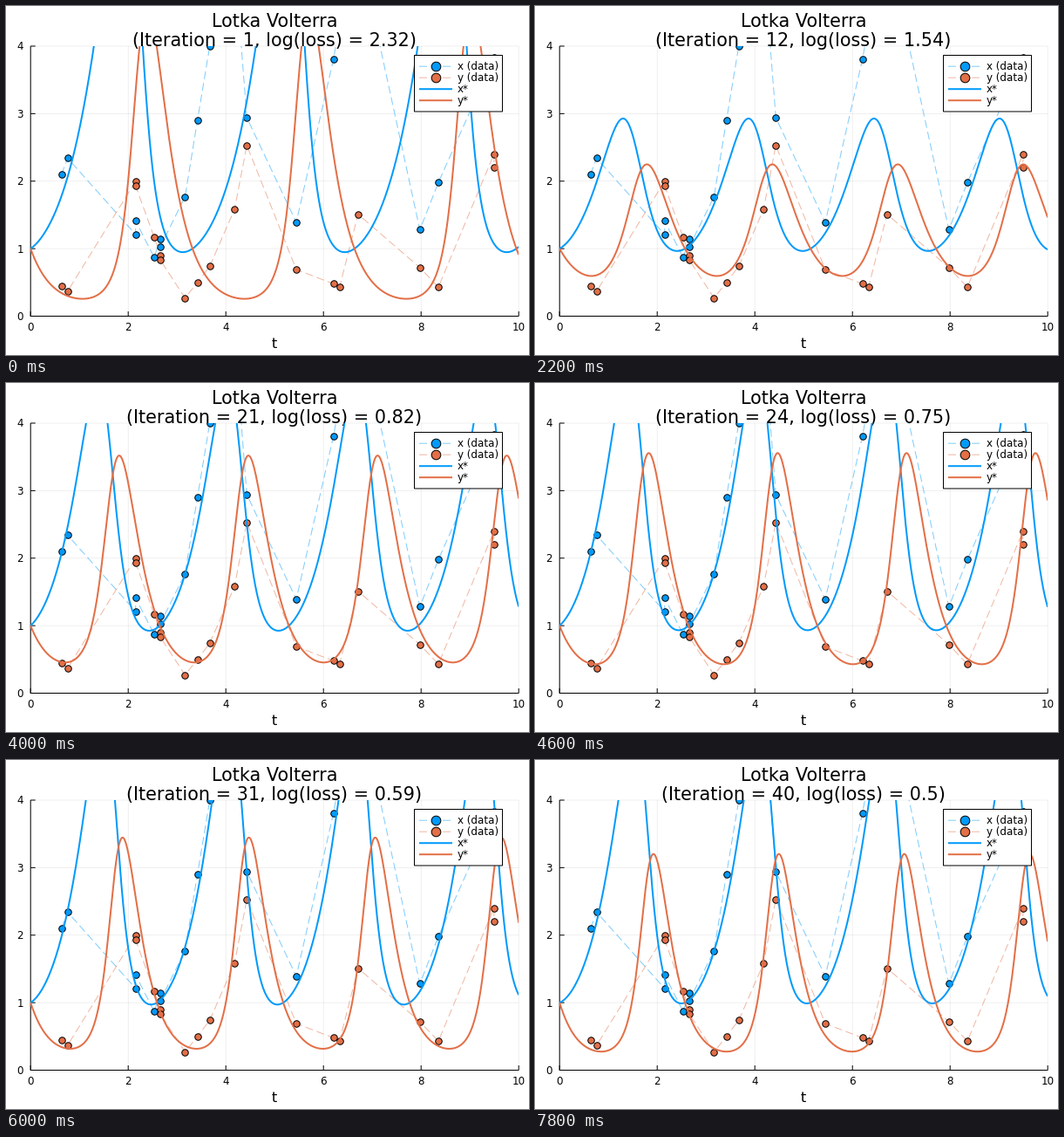
A matplotlib script that plays this animation: 600 by 400 pixels, repeating every 8 s.

```python
import numpy as np
import matplotlib.pyplot as plt
from matplotlib.animation import FuncAnimation
from matplotlib.patches import Rectangle

plt.rcParams["font.family"] = "DejaVu Sans"
plt.rcParams["path.snap"] = False

W, H, DPI = 600, 400, 100
PT = 72 / DPI                      # points per pixel
LEFT, RIGHT, TOP, BOTTOM = 28.2, 588.2, 46, 355.5
BLUE, RED = "#009AFA", "#E36F47"
N_ITER, STEP_MS = 40, 200

# turning points of the search: growth, predation, conversion, death, log(loss)
SEARCH = {
    1: (1.5, 1, 1, 3, 2.32),
    6: (1.955, 1.895, 1.882, 2.834, 1.76),
    12: (2.11, 1.696, 1.701, 3.009, 1.54),
    13: (1.9, 1.4, 1.35, 4.2, 1.49),
    21: (2.016, 1.346, 1.387, 3.191, 0.82),
    28: (1.988, 1.401, 1.331, 3.394, 0.68),
    35: (1.809, 1.517, 1.561, 3.904, 0.5),
}

# measured points: index on an 80-step time grid, x, y
SAMPLES = np.array([
    (5, 2.1, 0.45), (6, 2.34, 0.37), (17, 1.21, 2.0), (17, 1.41, 1.93),
    (20, 0.87, 1.17), (21, 1.15, 0.9), (21, 1.03, 0.83), (25, 1.77, 0.27),
    (27, 2.9, 0.5), (29, 4.0, 0.74), (33, 5.3, 1.58), (35, 2.94, 2.53),
    (43, 1.39, 0.69), (49, 3.8, 0.48), (50, 4.3, 0.43), (53, 5.5, 1.51),
    (63, 1.28, 0.72), (66, 1.98, 0.43), (75, 3.83, 2.4), (75, 3.6, 2.2),
])


def monotone(keys, vals, at):
    """Piecewise cubic through the keys without overshoot, held at the end."""
    at = np.minimum(at, keys[-1])
    h = np.diff(keys)[:, None]
    s = np.diff(vals, axis=0) / h
    prod, total = s[:-1] * s[1:], s[:-1] + s[1:]
    same = prod > 0
    inner = np.where(same, 2 * prod / np.where(same, total, 1), 0)
    m = np.vstack([s[:1], inner, 0 * s[-1:]])
    i = np.clip(np.searchsorted(keys, at, side="right") - 1, 0, len(keys) - 2)
    u = ((at - keys[i]) / h[i, 0])[:, None]
    return (vals[i] * (1 + 2 * u) * (1 - u) ** 2
            + vals[i + 1] * u ** 2 * (3 - 2 * u)
            + h[i] * u * (1 - u) * (m[i] * (1 - u) - m[i + 1] * u))


def solve(a, b, c, d, t):
    """Runge-Kutta for every parameter set at once; shape (time, 2, set)."""
    def rate(z):
        x, y = z
        return np.array([x * (a - b * y), y * (c * x - d)])

    dt = t[1] - t[0]
    z = np.ones((2, len(a)))
    out = [z]
    for _ in t[1:]:
        k1 = rate(z)
        k2 = rate(z + dt / 2 * k1)
        k3 = rate(z + dt / 2 * k2)
        k4 = rate(z + dt * k3)
        z = z + dt / 6 * (k1 + 2 * k2 + 2 * k3 + k4)
        out.append(z)
    return np.array(out)


path = monotone(np.array(list(SEARCH), float), np.array(list(SEARCH.values())),
                np.arange(1, N_ITER + 1))
time = np.linspace(0, 10, 1001)
orbit = solve(*path[:, :4].T, time)
losses = path[:, 4]

fig = plt.figure(figsize=(W / DPI, H / DPI), dpi=DPI, facecolor="white")
page = fig.add_axes([0, 0, 1, 1], zorder=1)
plot = fig.add_axes([LEFT / W, 1 - BOTTOM / H, (RIGHT - LEFT) / W,
                     (BOTTOM - TOP) / H], zorder=2)
key = fig.add_axes([0, 0, 1, 1], zorder=3)
for layer in (page, key):
    layer.set(xlim=(0, W), ylim=(H, 0))
    layer.axis("off")
plot.set(xlim=(0, 10), ylim=(0, 4))
plot.axis("off")


def label(ax, x, y, text, size, ha="center"):
    return ax.text(x, y, text, fontsize=size * PT, ha=ha, va="baseline")


def stroke(ax, xs, ys, color="black", width=1.0, **kw):
    return ax.plot(xs, ys, color=color, lw=width * PT,
                   solid_capstyle="butt", **kw)[0]


def series(ax, xs, ys, color, size):
    """Pale dashed line with outlined dots on it."""
    stroke(ax, xs, ys, color, alpha=0.5, ls=(0, (9, 4.5)))
    ax.scatter(xs, ys, s=(size * PT) ** 2, color=color, edgecolors="black",
               linewidths=PT, zorder=2)


# axes, ticks and grid
for v in range(0, 11, 2):
    px = LEFT + (RIGHT - LEFT) * v / 10
    stroke(page, [px, px], [TOP, BOTTOM], width=0.6, alpha=0.1)
    stroke(page, [px, px], [BOTTOM, BOTTOM - 5.5])
    label(page, px, 371.5, str(v), 11.9)
for v in range(5):
    py = BOTTOM + (TOP - BOTTOM) * v / 4
    stroke(page, [LEFT, RIGHT], [py, py], width=0.6, alpha=0.1)
    stroke(page, [LEFT, LEFT + 5.5], [py, py])
    label(page, 20, py + 4.4, str(v), 11.9, "right")
stroke(page, [LEFT, LEFT, RIGHT], [TOP, BOTTOM, BOTTOM])
label(page, 308, 392, "t", 16.3)
label(page, 308, 24, "Lotka Volterra", 20.8)
status = label(page, 308, 46, "", 20.8)

# measurements and fitted curves
steps, *measured = SAMPLES.T
for values, color in zip(measured, (BLUE, RED)):
    series(plot, steps * 10 / 79, values, color, 7.5)
curves = [stroke(plot, [], [], color, 2) for color in (BLUE, RED)]

# legend
key.add_patch(Rectangle((468.5, 56.5), 101, 64.5, fc="white", ec="black", lw=PT))
rows = (("x (data)", BLUE), ("y (data)", RED), ("x*", BLUE), ("y*", RED))
for n, (name, color) in enumerate(rows):
    py = 69.2 + 13 * n
    if "data" in name:
        stroke(key, [474, 512], [py, py], color, alpha=0.5, ls=(0, (9, 4.5)))
        series(key, [493], [py], color, 10.6)
    else:
        stroke(key, [474, 512], [py, py], color, 2)
    label(key, 517.5, py + 4.2, name, 11.9, "left")


def draw(n):
    for i, curve in enumerate(curves):
        curve.set_data(time, orbit[:, i, n])
    loss = round(float(losses[n]), 2)
    status.set_text(f"(Iteration = {n + 1}, log(loss) = {loss})")
    return [*curves, status]


anim = FuncAnimation(fig, draw, frames=N_ITER, interval=STEP_MS,
                     init_func=lambda: draw(0), repeat=True, repeat_delay=0)
plt.show()
```
